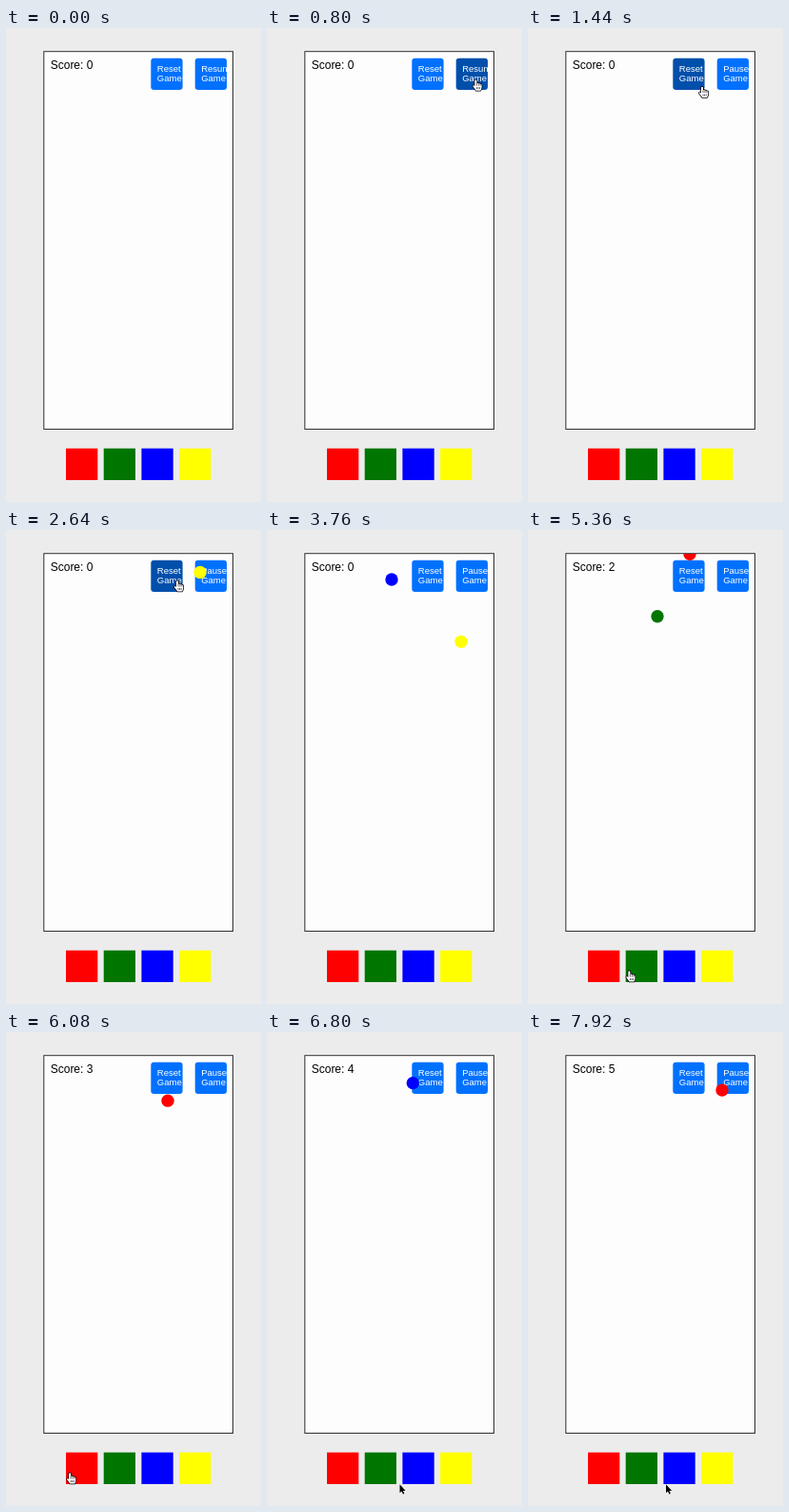
An HTML page with a canvas that plays this animation: 268x498 px, repeating every 8000 ms.

```html
<!DOCTYPE html>
<html lang="en">
<head>
<meta charset="utf-8">
<title>Colour match game</title>
<style>
  html, body { margin: 0; width: 100%; height: 100%; overflow: hidden; background: #ececec; }
  canvas { display: block; }
</style>
</head>
<body>
<canvas id="stage" width="268" height="498"></canvas>
<script>
const ctx = document.getElementById('stage').getContext('2d');
const LOOP = 8000, STEP = 80;
const TOP = 24.7, SPEED = 0.065, FIRST = 2335, EVERY = 1005;
const RESUMED = 960;
const FONT = '"Liberation Sans", Arial, sans-serif';
const COLORS = { red: '#f00', green: '#007500', blue: '#00f', yellow: '#ff0' };

const box = (x, y) => ({ x, y, size: 33.3 });
const reset = box(152.3, 31.7), toggle = box(198.7, 31.7);
const squares = {};
Object.keys(COLORS).forEach((name, i) => squares[name] = box(63 + 39.7 * i, 441.7));

// One ball is born every EVERY ms and falls until its square is clicked.
const balls = [
  ['yellow', 204, 4160], ['blue', 131, 4720], ['green', 136, 5480],
  ['red', 170, 6280], ['blue', 153.3, 7680], ['red', 204, Infinity]
].map(([color, x, hit], i) => ({ color, x, hit, born: FIRST + EVERY * i }));

// Pointer stops: both buttons, then the square of every clicked ball.
const stops = [
  { t: 560, x: 240, y: 56 }, { t: RESUMED, x: 218, y: 54 },
  { t: 1440, x: 183, y: 61.5 }, { t: 2640, x: 180, y: 53 },
  ...balls.filter(b => b.hit < LOOP)
    .map(b => ({ t: b.hit, x: squares[b.color].x + 3.5, y: 463 })),
  { t: 6800, x: 139.5, y: 475.2 }, { t: 7920, x: 145, y: 475.2 }
].sort((a, b) => a.t - b.t);

const hand = new Path2D(
  'M-1 1Q0-.6 1 1V4Q2 3 3 4.2Q4 3.6 4.8 4.8Q6.2 4.4 6.2 6V8.2Q6.2 10 5 11.5H.2' +
  'Q-1.2 9.4-3 7.2Q-3.2 5.6-1.8 6.2L-1 7Z');
const fingers = new Path2D('M1 4V6.5M3 4.2V6.5M4.8 4.8V6.5M1 8V10M2.6 8V10M4.2 8V10');
const arrow = new Path2D('M0 0V9L2 7.2L3.4 10.4L4.9 9.7L3.5 6.7H6.2Z');

function pointerAt(t) {
  const hidden = t < stops[0].t || (t > 3640 && t < 3860);
  if (hidden) return null;
  const i = stops.findIndex(s => s.t >= t);
  const to = stops[i], from = stops[i - 1] || to;
  const rest = ((to.t - t) / (to.t - from.t || 1)) ** 3;
  return { x: to.x + (from.x - to.x) * rest, y: to.y + (from.y - to.y) * rest };
}

const over = (p, b) =>
  p && p.x >= b.x && p.x <= b.x + b.size && p.y >= b.y && p.y <= b.y + b.size;

function text(str, x, y, size, color) {
  ctx.font = `${size}px ${FONT}`;
  ctx.fillStyle = color;
  ctx.fillText(str, x, y);
}

function button(b, label, hover) {
  ctx.save();
  ctx.beginPath();
  ctx.roundRect(b.x, b.y, b.size, b.size, 3.3);
  ctx.fillStyle = hover ? '#004fab' : '#0071ff';
  ctx.fill();
  ctx.clip();
  text(label, b.x + 6.5, 45.7, 9.5, '#fff');
  text('Game', b.x + 6.5, 56.3, 9.5, '#fff');
  ctx.restore();
}

function drawPointer(p) {
  const pointing = [reset, toggle, ...Object.values(squares)].some(b => over(p, b));
  const shape = pointing ? hand : arrow;
  ctx.save();
  ctx.translate(p.x, p.y);
  ctx.lineWidth = pointing ? 1.5 : 1;
  ctx.strokeStyle = pointing ? '#000' : '#fff';
  ctx.fillStyle = pointing ? '#fff' : '#000';
  ctx.stroke(shape);
  ctx.fill(shape);
  ctx.lineWidth = 0.6;
  if (pointing) ctx.stroke(fingers);
  ctx.restore();
}

function draw(t) {
  const pointer = pointerAt(t);
  ctx.fillStyle = '#ececec';
  ctx.fillRect(0, 0, 268, 498);
  ctx.fillStyle = '#fdfdfd';
  ctx.fillRect(39.8, 24.7, 198.7, 396.8);
  ctx.strokeStyle = '#303030';
  ctx.lineWidth = 1;
  ctx.strokeRect(39.8, 24.7, 198.7, 396.8);

  const score = balls.filter(b => t >= b.hit).length;
  text('Score: ' + score, 46.7, 42.5, 12, '#000');
  button(reset, 'Reset', over(pointer, reset));
  button(toggle, t < RESUMED ? 'Resume' : 'Pause', over(pointer, toggle));

  for (const [name, s] of Object.entries(squares)) {
    ctx.fillStyle = COLORS[name];
    ctx.fillRect(s.x, s.y, s.size, s.size);
  }

  ctx.save();
  ctx.beginPath();
  ctx.rect(40, 25, 198, 396);
  ctx.clip();
  for (const b of balls) {
    if (t < b.born || t >= b.hit) continue;
    ctx.beginPath();
    ctx.arc(b.x, TOP + (t - b.born) * SPEED, 6.7, 0, 2 * Math.PI);
    ctx.fillStyle = COLORS[b.color];
    ctx.fill();
  }
  ctx.restore();

  if (pointer) drawPointer(pointer);
}

let start;
function tick(now) {
  start ??= now;
  draw(Math.floor((now - start) % LOOP / STEP) * STEP);
  requestAnimationFrame(tick);
}
requestAnimationFrame(tick);
</script>
</body>
</html>
```
